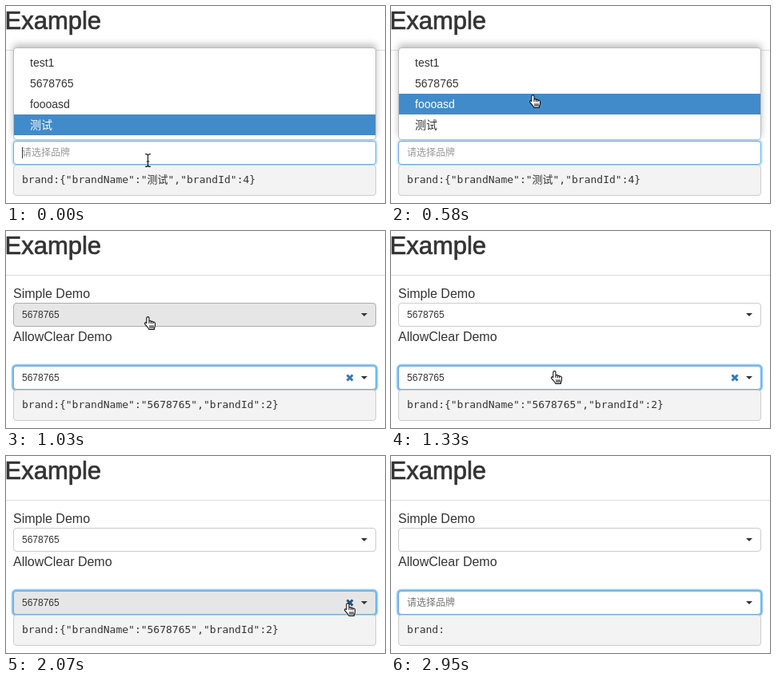
Recreate the animation shown at these times as an HTML page. Size 474 by 247 pixels, loop 3230 ms.

```html
<!DOCTYPE html>
<html lang="zh-CN">
<head>
<meta charset="utf-8">
<style>
  html, body { margin: 0; width: 100%; height: 100%; overflow: hidden; background: #fff; }
  svg { display: block; font: 12px "Liberation Sans", "Noto Sans CJK SC", "Noto Sans CJK", sans-serif; fill: #333; }
  .title { font-size: 31px; stroke: #333; stroke-width: .7px; }
  .label { font-size: 16px; }
  .code { font: 13px "DejaVu Sans Mono", "Noto Sans CJK SC", "Noto Sans CJK", monospace; white-space: pre; }
  .box { fill: #fff; stroke: #ccc; }
  .hover { fill: #e6e6e6; stroke: #adadad; }
  .focus { stroke: #66afe9; }
  .popup { fill: #fff; stroke: #bbb; filter: drop-shadow(0 -4px 4px rgba(0, 0, 0, .25)); }
  .item { font-size: 14px; }
  .cursor { fill: #fff; stroke: #111; stroke-width: 1.1px; stroke-linejoin: round; stroke-linecap: round; }
</style>
</head>
<body>
<svg width="474" height="247" viewBox="0 0 474 247">
  <text class="title" x="-1.5" y="29">Example</text>
  <path d="M0 55.5H474" stroke="#ddd"/>
  <text class="label" x="9" y="84">Simple Demo</text>
  <rect id="simple" x="9.5" y="90.5" width="453" height="29" rx="3.5"/>
  <text id="simpleText" x="20" y="109"></text>
  <path d="M444 103h8l-4 4z"/>
  <text class="label" x="9" y="138">AllowClear Demo</text>

  <rect id="ring" x="8.5" y="168.5" width="455" height="31" rx="4" fill="none" stroke="#66afe9"
        stroke-width="2" style="filter:drop-shadow(0 0 1px #66afe9)"/>
  <rect id="field" x="9.5" y="169.5" width="453" height="29" rx="3.5"/>
  <path id="pressed" d="M10 171.5H462" stroke="#000" stroke-width="3" opacity=".1"/>
  <text id="fieldText" x="20" y="188"></text>
  <path id="clear" d="M426.5 180.5l7 7m0-7l-7 7" stroke-width="3"/>
  <path id="arrow" d="M444 182h8l-4 4z"/>
  <path id="caret" d="M20.5 177V191" stroke="#333"/>

  <rect x="9.5" y="199.5" width="453" height="38" rx="3.5" fill="#f3f3f3" stroke="#ccc"/>
  <text id="code" class="code" x="20" y="222"></text>

  <g id="menu">
    <rect class="popup" x="9.5" y="52.5" width="453" height="115" rx="3.5"/>
    <rect id="mark" x="10" width="452" height="26" fill="#428bca"/>
  </g>

  <path id="hand" class="cursor" d="M5.4.6c1 0 1.6.6 1.6 1.6V6c1-.7 2.2-.4 2.5.5 1-.5 2-.1 2.3.7 1.5-.4 2.7.3 2.7 1.8v2.4c0 1.8-1 2.4-1.2 5H6.8C6.4 14.4 3.6 12 1.7 9.6 .9 8.3 2.3 7.2 3.8 8.5V2.2c0-1 .6-1.6 1.6-1.6zM7 6v2.5M9.5 6.5v2.2M11.8 7.2v1.8M8 11.5v3M10 11.5v3M12 11.5v3"/>
  <path id="pointer" class="cursor" style="fill:#000;stroke:#fff" d="M.6.8V15l3.3-3.1 2.1 5 2.5-1-2.1-4.8h4.8z"/>
  <path id="beam" class="cursor" style="fill:none" d="M.6.6q2.9 0 2.9 2v11.8q0 2-2.9 2M6.4.6q-2.9 0-2.9 2m0 11.8q0 2 2.9 2M2 10h3"/>
</svg>
<script>
const $ = id => document.getElementById(id);
const show = (id, on) => $(id).style.display = on ? "" : "none";
const LOOP = 3230, HINT = "请选择品牌";
const items = ["test1", "5678765", "foooasd", "测试"];

const labels = items.map((name, i) => {
  const text = document.createElementNS("http://www.w3.org/2000/svg", "text");
  text.setAttribute("class", "item");
  text.setAttribute("x", 30);
  text.setAttribute("y", 76 + 26 * i);
  text.textContent = name;
  return $("menu").appendChild(text);
});

// start time, cursor kind, x, y
const moves = [
  [0, "beam", 174, 185], [140, "beam", 174, 184], [290, "hand", 172, 137],
  [440, "hand", 172, 129], [580, "hand", 172, 111], [730, "hand", 172, 107],
  [1330, "hand", 199, 175], [1480, "pointer", 260, 210], [1630, "pointer", 381, 201],
  [1770, "hand", 402, 196], [1920, "hand", 417, 188], [2070, "hand", 422, 184],
  [2800, "pointer", 450, 244], [2950, "none", 0, 0]
];

function draw(t) {
  const within = (a, b) => t >= a && t < b;
  const open = t < 1030, cleared = t >= 2510, down = within(2360, 2510);
  const picked = t < 440 ? 3 : t < 730 ? 2 : 1;
  const over = within(1920, 2800);

  show("menu", open);
  $("mark").setAttribute("y", 58 + 26 * picked);
  labels.forEach((el, i) => el.style.fill = i === picked ? "#fff" : "#333");

  $("simple").setAttribute("class", within(1030, 1330) ? "box hover" : "box");
  $("simpleText").textContent = open || cleared ? "" : items[1];

  const hint = open || cleared;
  $("field").setAttribute("class", "box" + (over ? " hover" : "") + (down ? "" : " focus"));
  $("fieldText").textContent = hint ? HINT : items[1];
  $("fieldText").style.fill = open ? "#999" : cleared ? "#777" : "#333";
  show("ring", !down);
  $("ring").style.opacity = open ? .3 : .85;
  show("pressed", down);
  show("clear", !hint);
  $("clear").style.stroke = t >= 2070 ? "#23527c" : "#337ab7";
  show("arrow", !open);
  show("caret", t < 440 || within(880, 1030));

  const [name, id] = open ? [items[3], 4] : [items[1], 2];
  $("code").textContent = "brand:" + (cleared ? "" : `{"brandName":"${name}","brandId":${id}}`);

  const [, kind, x, y] = moves.findLast(m => m[0] <= t);
  for (const c of ["hand", "pointer", "beam"]) show(c, c === kind);
  if (kind !== "none") $(kind).setAttribute("transform", `translate(${x} ${y})`);
}

const start = performance.now();
function tick() {
  draw((performance.now() - start) % LOOP);
  requestAnimationFrame(tick);
}
tick();
</script>
</body>
</html>
```
